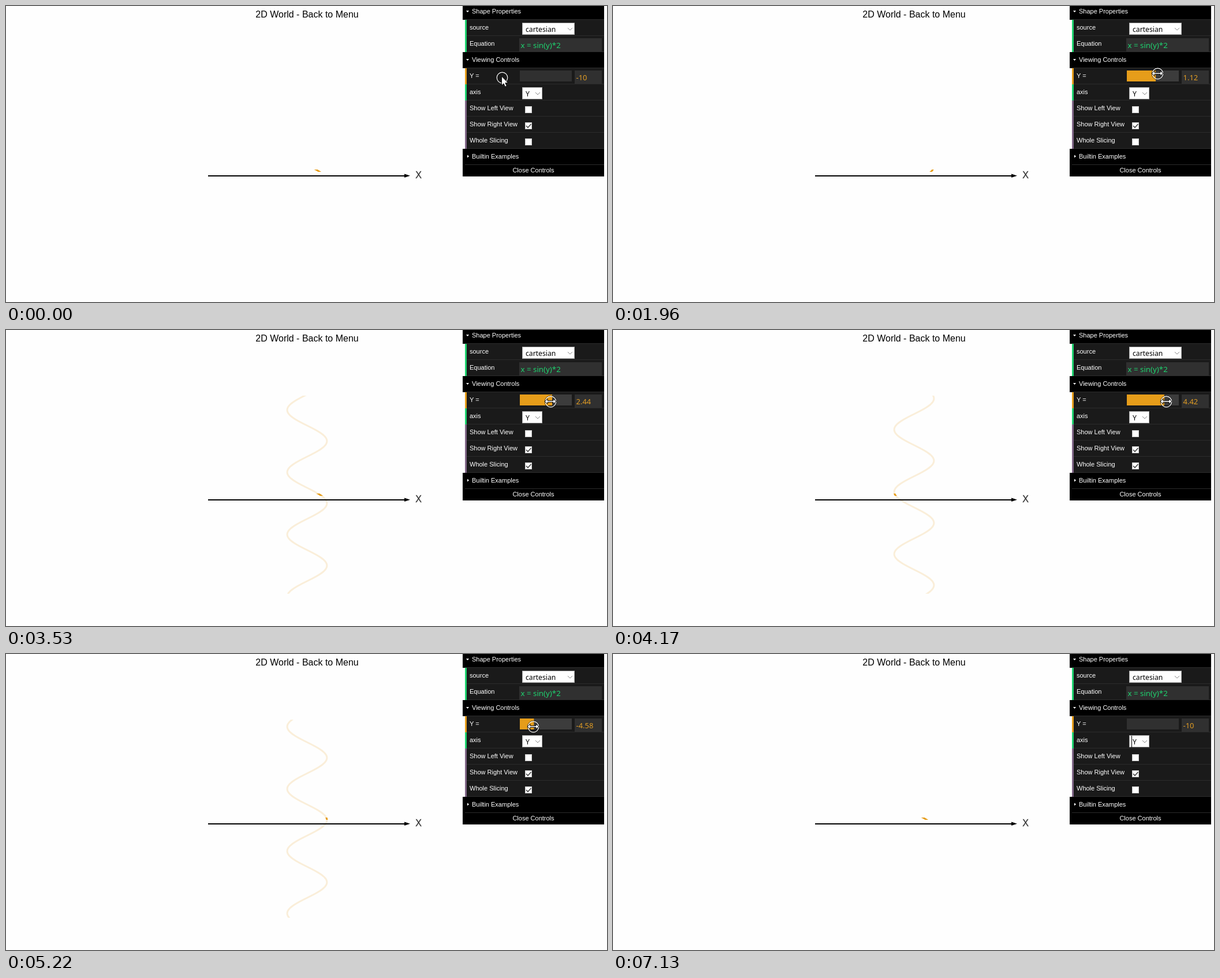
Write an HTML page that moves like this. It is 1041x514 px and loops after 7.23 s.

```html
<!DOCTYPE html>
<html lang="en">
<head>
<meta charset="utf-8">
<title>2D World</title>
<style>
html, body { margin: 0; width: 100%; height: 100%; overflow: hidden; background: #fefefe; }
svg { display: block; width: 1041px; height: 514px; }
text { font: 11px "Liberation Sans", Arial, sans-serif; fill: #fff; white-space: pre; }
.big { font-size: 16px; fill: #000; }
.field { font: 13px "Noto Sans", sans-serif; }
.pick { font: 12.2px "Noto Sans", sans-serif; fill: #000; }
.wave { fill: none; stroke: #e69d1a; stroke-width: 3; }
</style>
</head>
<body>
<svg viewBox="0 0 1041 514">
  <defs>
    <clipPath id="whole"><rect x="400" y="114" width="240" height="344"/></clipPath>
    <clipPath id="slice"><rect x="400" y="284" width="240" height="4"/></clipPath>
  </defs>
  <text class="big" x="521.5" y="20" text-anchor="middle">2D World - Back to Menu</text>
  <g clip-path="url(#whole)"><path id="ghost" class="wave" opacity=".16"/></g>
  <g clip-path="url(#slice)"><path id="spot" class="wave"/></g>
  <path d="M350 295H692" stroke="#000" stroke-width="2"/>
  <path d="M690 291.5L700 294.8L690 298Z"/>
  <text class="big" x="709.3" y="299" style="fill:#333;stroke:#333;stroke-width:.3">X</text>

  <g id="panel"></g>
  <rect id="track" x="890" y="112" width="90" height="19"/>
  <rect id="fill" x="890" y="112" height="19" fill="#e69d1a"/>
  <text id="value" class="field" x="987.5" y="129" style="fill:#e09c24"></text>
  <path id="caret" d="M898.5 142V162" stroke="#000"/>

  <g id="cursor">
    <circle cx=".5" cy=".5" r="10.3" fill="none" stroke="#111" stroke-width=".8"/>
    <circle cx=".5" cy=".5" r="9.3" fill="none" stroke="#fff" stroke-width="1.2"/>
    <path id="arrow" d="M-.5-2V14L3 10.7L5.5 16.2L8.3 15L5.8 9.6H10.8Z" fill="#fff" stroke="#000" stroke-width=".9"/>
    <path id="resize" d="M-10 0L-5-4.5V-1.3H5V-4.5L10 0L5 4.5V1.3H-5V4.5Z" fill="#fff" stroke="#000"/>
  </g>
</svg>
<script>
const $ = id => document.getElementById(id);
const GREEN = '#1ed36f', ORANGE = '#e69d1a', PURPLE = '#806787';
const ROW = 28, LOOP = 7230, UNIT = 17.2;

const rect = (x, y, w, h, fill, extra = '') =>
  `<rect x="${x}" y="${y}" width="${w}" height="${h}" fill="${fill}" ${extra}/>`;
const text = (x, y, s, extra = '') => `<text x="${x}" y="${y}" ${extra}>${s}</text>`;

const folder = (label, open = true) => y => rect(791, y, 245, ROW, '#000')
  + rect(795, y + 27, 241, 1, '#2c2c2c')
  + `<path d="${open ? `M797 ${y + 12}h5l-2.5 3z` : `M799 ${y + 10.5}v5l3-2.5z`}" fill="#fff"/>`
  + text(807, y + 17, label);
const row = (label, color, field) => y => rect(795, y, 241, 27, '#1a1a1a')
  + rect(795, y + 27, 241, 1, '#2c2c2c') + rect(795, y, 3, ROW, color)
  + text(803, y + 17, label) + field(y);

const select = (w, label) => y => rect(894.5, y + 5.5, w, 20, '#fff', 'stroke="#a9a9a9"')
  + text(900, y + 21, label, 'class="pick"')
  + `<path d="M${883 + w} ${y + 14}l4 4l4-4" fill="none" stroke="#888"/>`;
const check = (id, on) => y => rect(899.5, y + 10.5, 11, 11, '#fff', 'stroke="#ccc"')
  + `<path id="${id}" d="M901 ${y + 16}l3 3l5.5-6" fill="none" stroke="#444" stroke-width="1.6" visibility="${on ? 'visible' : 'hidden'}"/>`;
const equation = y => rect(889, y + 4, 143, 23, '#303030')
  + text(891.5, y + 21, 'x = sin(y)*2', `class="field" style="fill:${GREEN};font-size:13.3px"`);
const number = y => rect(985, y + 4, 47, 23, '#303030');

$('panel').innerHTML = [
  folder('Shape Properties'),
  row('source', GREEN, select(90, 'cartesian')),
  row('Equation', GREEN, equation),
  folder('Viewing Controls'),
  row('Y =', ORANGE, number),
  row('axis', GREEN, select(34, 'Y')),
  row('Show Left View', PURPLE, check('left')),
  row('Show Right View', PURPLE, check('right', true)),
  row('Whole Slicing', PURPLE, check('slicing')),
  folder('Builtin Examples', false)
].map((part, i) => part(i * ROW - 4)).join('')
  + rect(791, 276, 245, 20, '#000')
  + text(913.5, 289, 'Close Controls', 'text-anchor="middle"');

// Stops of the pointer: time, x, y, slider value
const stops = [
  [0, 859, 124, -10], [570, 859, 124, -10], [720, 891, 121, -10],
  [1960, 943, 117, 1.12], [2780, 947, 121, 2.44], [3200, 905, 235, 2.44],
  [3530, 943, 124, 2.44], [4170, 958, 124, 4.42], [4360, 962, 124, 5],
  [4800, 934, 125, 0.01], [5650, 892, 127, -9.25], [5810, 888, 127, -10],
  [6250, 905, 235, -10], [6860, 1000, 530, -10], [LOOP, 1000, 530, -10]
];

function pose(t) {
  const i = stops.findIndex(s => s[0] > t), a = stops[i - 1], b = stops[i];
  const p = (t - a[0]) / (b[0] - a[0]);
  return a.map((n, j) => n + (b[j] - n) * p);
}

function wave(v, from, to) {
  const points = [];
  for (let y = from; y <= to; y += 2) {
    points.push((521.5 + 2 * UNIT * Math.sin(v + (286 - y) / UNIT)).toFixed(2) + ' ' + y);
  }
  return 'M' + points.join('L');
}

const show = (id, on) => $(id).setAttribute('visibility', on ? 'visible' : 'hidden');

function draw(now) {
  const t = now % LOOP;
  const [, x, y, v] = pose(t);
  const hover = x >= 886 && y > 110 && y < 133;
  const whole = t >= 3200 && t < 6250;

  $('ghost').setAttribute('d', wave(v, 110, 462));
  $('spot').setAttribute('d', wave(v, 276, 296));
  $('fill').setAttribute('width', (v + 10) * 4.5);
  $('track').setAttribute('fill', hover ? '#3c3c3c' : '#303030');
  $('value').textContent = +v.toFixed(2);
  $('cursor').setAttribute('transform', `translate(${Math.round(x)} ${Math.round(y)})`);
  show('ghost', whole);
  show('slicing', whole);
  show('arrow', !hover);
  show('resize', hover);
  show('caret', t >= 7130);
  requestAnimationFrame(draw);
}
draw(0);
</script>
</body>
</html>
```
